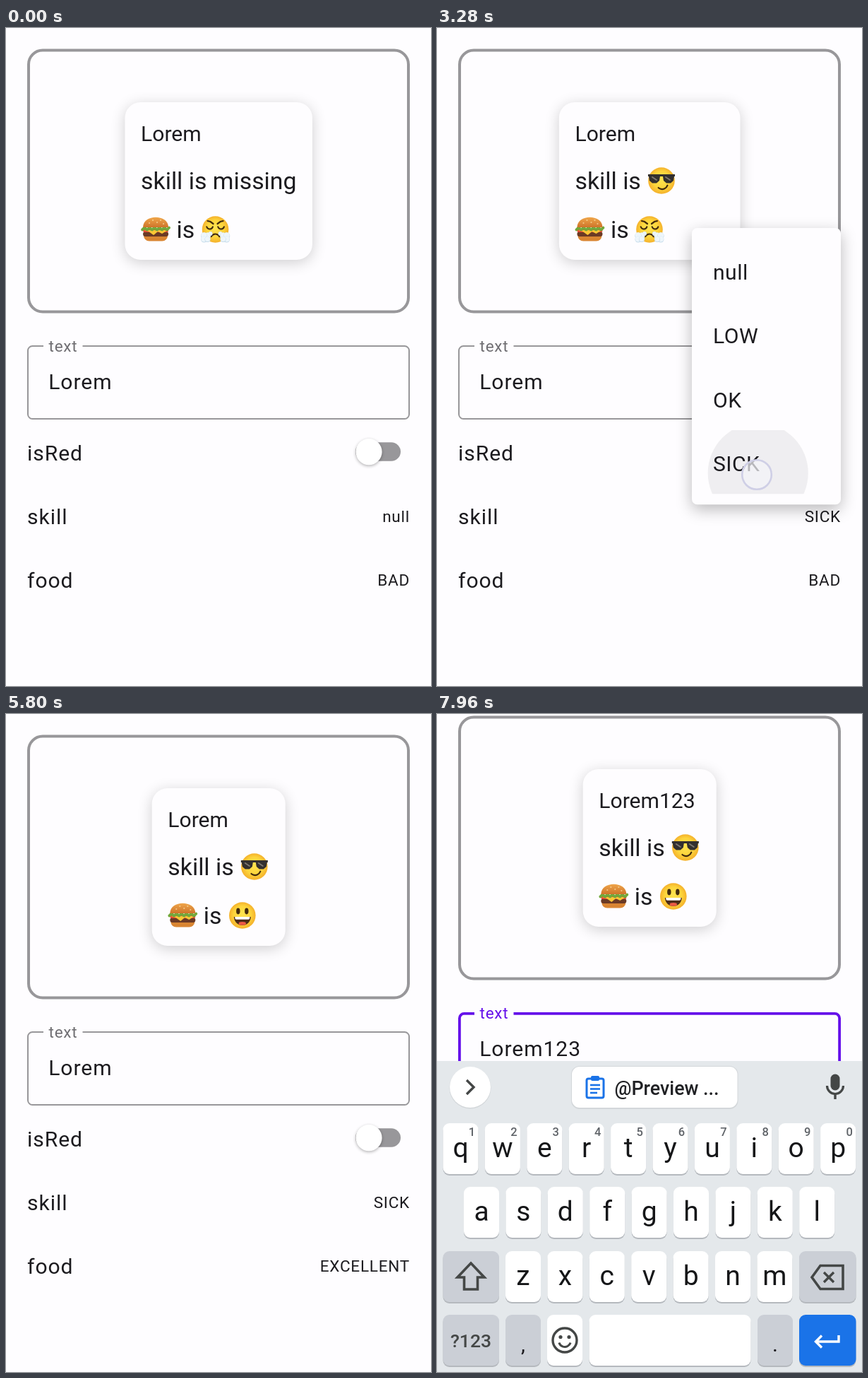
Recreate the animation shown at these times as an HTML page with a canvas. Size 602 by 931 pixels, loop 8000 ms.

```html
<!DOCTYPE html>
<html lang="en">
<head>
<meta charset="utf-8">
<title>Component preview</title>
<style>
html, body { margin: 0; width: 100%; height: 100%; overflow: hidden; background: #fefdff; }
canvas { display: block; }
</style>
</head>
<body>
<canvas id="stage" width="602" height="931"></canvas>
<script>
const ctx = document.getElementById('stage').getContext('2d');
const LOOP = 8000, BG = '#fefdff', INK = '#1c1b1f', PURPLE = '#6510ea', GREY = '#98979a';
const BODY = 30.08, TITLE = 33.84, SMALL = 22.56;

// Moments of the interaction, in ms
const RED_ON = 300, RED_OFF = 957, SKILL_TAP = 2335, SKILL_SET = 3237, FOOD_TAP = 4260,
  FOOD_SET = 5150, FOCUS = 6280, KEYS_UP = 6660, TYPED = [7100, 7240, 7380];

const taps = [
  { x: 195, y: 609, from: 140, to: RED_ON + 60 },
  { x: 195, y: 609, from: 790, to: RED_OFF + 60 },
  { x: 190, y: 698, from: 2170, to: SKILL_TAP + 60 },
  { x: 453, y: 632, from: 3010, to: SKILL_SET + 60 },
  { x: 190, y: 786, from: 4060, to: FOOD_TAP + 60 },
  { x: 455, y: 712, from: 4930, to: FOOD_SET + 60 },
  { x: 350, y: 505, from: 6040, to: FOCUS + 60 }
];

const menus = [
  { x: 361, y: 283, items: ['null', 'LOW', 'OK', 'SICK'], open: SKILL_TAP + 50, close: SKILL_SET + 50,
    pick: 3, tap: SKILL_SET, px: 453, py: 632 },
  { x: 346.5, y: 464, items: ['BAD', 'GOOD', 'EXCELLENT'], open: FOOD_TAP + 50, close: FOOD_SET + 50,
    pick: 2, tap: FOOD_SET, px: 455, py: 712 }
];

const clamp = v => Math.max(0, Math.min(1, v));
const mix = (a, b, k) => a + (b - a) * k;
const ramp = (t, start, length) => clamp((t - start) / length);

function bezier(x1, x2, y1, y2) {
  const at = (a, b, s) => 3 * a * s * (1 - s) ** 2 + 3 * b * s * s * (1 - s) + s ** 3;
  return x => {
    let lo = 0, hi = 1;
    for (let i = 0; i < 20; i++) {
      const mid = (lo + hi) / 2;
      if (at(x1, x2, mid) < x) lo = mid; else hi = mid;
    }
    return at(y1, y2, lo);
  };
}
const standard = bezier(0.4, 0.2, 0, 1);
const decelerate = bezier(0, 0.2, 0, 1);

function layer(draw, alpha = 1) {
  if (alpha <= 0) return;
  ctx.save();
  ctx.globalAlpha *= alpha;
  draw();
  ctx.restore();
}

function path(points, close) {
  ctx.beginPath();
  points.forEach(([x, y]) => ctx.lineTo(x, y));
  if (close) ctx.closePath();
}

function box(x, y, w, h, r, fill) {
  ctx.beginPath();
  ctx.roundRect(x, y, w, h, r);
  if (fill) { ctx.fillStyle = fill; ctx.fill(); }
}

function disc(x, y, rx, fill, ry = rx) {
  ctx.beginPath();
  ctx.ellipse(x, y, rx, ry, 0, 0, 7);
  ctx.fillStyle = fill;
  ctx.fill();
}

function stroke(color, width) {
  ctx.strokeStyle = color;
  ctx.lineWidth = width;
  ctx.stroke();
}

function arc(x, y, r, a, b, color, width) {
  ctx.beginPath();
  ctx.arc(x, y, r, a, b);
  stroke(color, width);
}

function label(s, x, y, size, { color = INK, gap = 0, align = 'left', weight = 400 } = {}) {
  ctx.font = `${weight} ${size}px Roboto, sans-serif`;
  ctx.letterSpacing = gap + 'px';
  ctx.fillStyle = color;
  ctx.textAlign = align;
  ctx.fillText(s, x, y);
  return ctx.measureText(s).width;
}

function raised(x, y, w, h, r, blur, drop, alpha) {
  layer(() => {
    ctx.shadowColor = `rgba(0,0,0,${alpha})`;
    ctx.shadowBlur = blur;
    ctx.shadowOffsetY = drop;
    box(x, y, w, h, r, BG);
  });
}

// Press ripple that drifts from the touch point to the middle of its box
function ripple(t, start, x, y, w, h, px, py) {
  const alpha = Math.min(ramp(t, start, 75), 1 - ramp(t, start + 225, 150));
  if (alpha <= 0) return;
  const k = standard(ramp(t, start, 225));
  layer(() => {
    box(x, y, w, h, 0);
    ctx.clip();
    const r = mix(0.3 * Math.max(w, h), Math.hypot(w, h) / 2 + 10, k);
    disc(mix(px, x + w / 2, k), mix(py, y + h / 2, k), r, 'rgba(10,10,16,.097)');
  }, alpha);
}

function face() {
  const g = ctx.createRadialGradient(0, -3, 2, 0, 0, 19);
  g.addColorStop(0, '#ffe24d');
  g.addColorStop(0.6, '#fdd43b');
  g.addColorStop(1, '#f4b02b');
  disc(0, 0, 18.8, g);
}

const emoji = {
  cool() {
    face();
    arc(1, 4, 8, 0.35, 2.3, '#422b0d', 2.2);
    ctx.fillStyle = '#33302f';
    ctx.fillRect(-19, -9, 38, 3);
    for (const s of [-1, 1]) {
      path([[s * 1.5, -9], [s * 18.5, -9], [s * 17, 0], [s * 13, 3.5], [s * 7, 3.5], [s * 3, 0]], true);
      ctx.fill();
    }
    for (const x of [-13, 6]) {
      path([[x, -5], [x + 6, -1]]);
      stroke('#7d7770', 2);
    }
  },
  huff() {
    face();
    for (const s of [-1, 1]) {
      path([[s * 3, -8], [s * 7, -11], [s * 11, -12]]);
      stroke('#422b0d', 2.2);
      arc(s * 8, -5, 4.5, 0.3, 2.85, '#422b0d', 2.2);
    }
    arc(0, 13, 6.5, 3.6, 5.83, '#422b0d', 2.2);
    for (const s of [-1, 1]) {
      for (const [x, y, r] of [[7, 6, 2.5], [11, 9, 4], [16, 9, 4.2], [16, 14, 4], [11, 14, 3.6]]) {
        disc(s * x, y, r + 0.5, '#c5dbea');
        disc(s * x, y - 0.5, r, '#eef6fb');
      }
    }
  },
  happy() {
    face();
    for (const s of [-1, 1]) disc(s * 6, -6, 2.7, '#422b0d', 4.4);
    path([[-12, 2], [12, 2]]);
    ctx.bezierCurveTo(11, 18, -11, 18, -12, 2);
    ctx.fillStyle = '#4c2b17';
    ctx.fill();
    box(-10.5, 2, 21, 3.8, [0, 0, 2, 2], '#fff');
    disc(0, 11.4, 5.2, '#ec5a45', 2.4);
  },
  burger() {
    box(-17, 7, 34, 9.5, [2, 2, 9, 9], '#d98532');
    box(-18, 3, 36, 7, 3.5, '#6b3a25');
    box(-18, 0, 36, 4, 2, '#e2482f');
    path([[-17, 1], [17, 1], [9, 6], [3, 3], [-3, 8], [-10, 3]], true);
    ctx.fillStyle = '#fcc735';
    ctx.fill();
    ctx.beginPath();
    for (let x = -19; x <= 19; x++) ctx.lineTo(x, -1 + 1.4 * Math.sin(x * 0.9));
    stroke('#72a83b', 3.8);
    path([[-18, -3]]);
    ctx.bezierCurveTo(-18, -22, 18, -22, 18, -3);
    const g = ctx.createLinearGradient(0, -17, 0, -2);
    g.addColorStop(0, '#efa54a');
    g.addColorStop(1, '#cc7128');
    ctx.fillStyle = g;
    ctx.fill();
    for (const [x, y] of [[-9, -9], [-4, -13], [2, -10], [7, -13], [11, -8]]) disc(x, y, 1.1, '#fbe0a4', 0.8);
  }
};

function glyph(name, x, y) {
  layer(() => {
    ctx.translate(x, y);
    ctx.lineCap = 'round';
    emoji[name]();
  });
}

function card(t, text) {
  box(32, 31.5, 538, 370, 20);
  stroke(GREY, 4);

  // Critically damped spring for the width
  const s = Math.max(0, t - SKILL_SET - 15) * 0.02;
  const w = mix(189, 265.5, (1 + s) * Math.exp(-s));
  const x = 301.2 - w / 2, left = x + 22.6;
  raised(x, 105, w, 223, 22, 20, 4, 0.19);
  label(text, left, 160, BODY, { color: t >= RED_ON && t < RED_OFF ? '#f00' : INK });
  if (t < SKILL_SET) {
    label('skill is missing', left, 228, TITLE);
  } else {
    label('skill is ', left, 228, TITLE);
    glyph('cool', left + 122.5, 216);
  }
  glyph('burger', left + 21, 285);
  label('is', left + 50.5, 296.5, TITLE);
  glyph(t < FOOD_SET ? 'huff' : 'happy', left + 105.5, 285);
}

function outline(color, w) {
  const l = 30 + w / 2, r = 572 - w / 2, top = 449 + w / 2, bottom = 554 - w / 2;
  ctx.beginPath();
  ctx.moveTo(108.5, top);
  ctx.arcTo(r, top, r, bottom, 6.5);
  ctx.arcTo(r, bottom, l, bottom, 6.5);
  ctx.arcTo(l, bottom, l, top, 6.5);
  ctx.arcTo(l, top, r, top, 6.5);
  ctx.lineTo(53, top);
  stroke(color, w);
  label('text', 60.5, 458, SMALL, { color: color === GREY ? '#6f6e72' : color, gap: 0.75 });
}

function field(t, text) {
  const focus = ramp(t, FOCUS, 150), width = mix(2, 3.8, focus);
  layer(() => outline(GREY, width), focus < 1 ? 1 : 0);
  layer(() => outline(PURPLE, width), focus);
  const w = label(text, 60.2, 511, BODY, { gap: 0.94 });
  if (t < FOCUS) return;

  if (t > KEYS_UP && t < TYPED[0]) {
    ctx.fillStyle = INK;
    ctx.fillRect(60.5, 513, w - 3, 2);
  }
  const lastInput = [FOCUS, ...TYPED].filter(v => v <= t).pop();
  const x = 59 + w;
  if ((t - lastInput) % 1000 < 500) {
    ctx.fillStyle = PURPLE;
    ctx.fillRect(x - 1.9, 479, 3.8, 40);
  }
}

function handle(t) {
  if (t < FOCUS || t >= TYPED[0]) return;
  const x = 149;
  disc(x, 555, 19.3, '#6200ee');
  path([[x, 527.5], [x + 13.8, 541.5], [x, 555], [x - 13.8, 541.5]], true);
  ctx.fill();
}

function toggle(t) {
  const on = t >= RED_ON && t < RED_OFF;
  const k = standard(ramp(t, RED_ON + 15, 100)) - standard(ramp(t, RED_OFF + 18, 100));
  box(495, 586.3, 64, 26.4, 13.2, on ? '#7cc1c0' : GREY);
  layer(() => {
    ctx.shadowColor = 'rgba(0,0,0,.3)';
    ctx.shadowBlur = 4;
    ctx.shadowOffsetY = 1.5;
    disc(mix(514, 540, k), 599.7, 18.6, on ? '#018786' : '#fff');
  });
}

function rows(t) {
  ripple(t, RED_ON, 0, 555, 602, 89.5, 195, 609);
  ripple(t, RED_OFF, 0, 555, 602, 89.5, 195, 609);
  ripple(t, SKILL_TAP, 0, 645, 602, 90, 190, 698);
  ripple(t, FOOD_TAP, 0, 735, 602, 90, 190, 786);
  ['isRed', 'skill', 'food'].forEach((s, i) => label(s, 30, 612 + 90 * i, BODY, { gap: 0.94 }));
  toggle(t);
  const value = { gap: 0.75, align: 'right' };
  label(t < SKILL_SET ? 'null' : 'SICK', 572, 699, SMALL, value);
  label(t < FOOD_SET ? 'BAD' : 'EXCELLENT', 572, 789, SMALL, value);
}

function menu(t, m) {
  if (t < m.open || t > m.close + 75) return;
  const w = 572 - m.x, h = m.items.length * 90.3 + 30;
  const scale = mix(0.8, 1, decelerate(ramp(t, m.open, 120)));
  layer(() => {
    ctx.translate(572, m.y + h);
    ctx.scale(scale, scale);
    ctx.translate(-572, -m.y - h);
    raised(m.x, m.y, w, h, 7.5, 22, 7, 0.27);
    m.items.forEach((s, i) => label(s, m.x + 30, m.y + 73 + 90.3 * i, BODY, { gap: 0.5 }));
    ripple(t, m.tap, m.x, m.y + 15 + 90.3 * m.pick, w, 90.3, m.px, m.py);
  }, Math.min(ramp(t, m.open, 30), 1 - ramp(t, m.close, 75)));
}

function touch(t, { x, y, from, to }) {
  layer(() => {
    disc(x, y, 21, 'rgba(244,244,248,.72)');
    arc(x, y, 20.8, 0, 7, '#cfcfe6', 2.6);
  }, Math.min(ramp(t, from, 100), 1 - ramp(t, to, 120)));
}

function key(x, y, w, fill = '#fff') {
  box(x, y + 2, w, 72, 9, '#b5b9be');
  box(x, y, w, 72, 9, fill);
}

function keyRow(letters, x, y, hints) {
  [...letters].forEach((c, i) => {
    const left = x + 59.4 * i;
    key(left, y, 50);
    label(c, left + 25, y + 48, 39, { color: '#151618', align: 'center' });
    if (hints) label((i + 1) % 10, left + 41, y + 18, 16.5, { color: '#5f6368', align: 'center', weight: 500 });
  });
}

function suggestion(t) {
  const wide = t < TYPED[0];
  const x = wide ? 102 : 191, w = wide ? 416 : 234.5;
  const cx = wide ? 134 : 224;
  box(x - 1, 498, w + 2, 61, 12, '#d3d7da');
  box(x, 499, w, 58, wide ? [11, 0, 0, 11] : 11, '#fff');
  box(cx - 12, 516, 24, 27, 2.5);
  stroke('#1a73e8', 3);
  box(cx - 6, 512, 12, 7, 2, '#1a73e8');
  [[525, 7], [530.5, 7], [536, 3]].forEach(([y, end]) => {
    path([[cx - 7, y], [cx + end, y]]);
    stroke('#1a73e8', 2.6);
  });
  label(wide ? '@Preview @Composable fun' : '@Preview ...', cx + 27.5, 539, 26.8, { color: '#202124', weight: 500 });
}

function toolbar(t) {
  disc(47, 529, 29.5, '#d3d7da');
  disc(47, 528, 29, '#fff');
  path([[42, 518], [52, 528], [42, 538]]);
  stroke('#444746', 3.4);
  suggestion(t);
  box(557.5, 509.5, 13, 23, 6.5, '#444746');
  arc(564, 526, 11.5, 0, Math.PI, '#444746', 3.2);
  path([[564, 537], [564, 545]]);
  stroke('#444746', 3.4);
}

function specialKeys() {
  const dark = '#cbcfd6', ink = '#444746';
  key(8.5, 760, 79.5, dark);
  key(513, 760, 80.5, dark);
  key(8.5, 850, 79.5, dark);
  key(97, 850, 50, dark);
  key(156, 850, 50);
  key(215.5, 850, 229);
  key(454, 850, 50, dark);
  key(513, 850, 80.5, '#1a73e8');

  path([[48, 777], [67, 797], [57.5, 797], [57.5, 814], [38.5, 814], [38.5, 797], [29, 797]], true);
  stroke(ink, 3.6);
  path([[543, 780.5], [575, 780.5], [575, 813.5], [543, 813.5], [531, 797]], true);
  stroke(ink, 3.6);
  for (const s of [-1, 1]) {
    path([[548, 797 - 7 * s], [562, 797 + 7 * s]]);
    stroke(ink, 3.4);
  }
  label('?123', 48, 896, 26.5, { color: ink, align: 'center', weight: 500 });
  label(',', 122, 902, 30, { align: 'center' });
  label('.', 479, 902, 30, { align: 'center' });
  arc(181, 886, 17, 0, 7, ink, 3.4);
  disc(175, 881.5, 2.6, ink);
  disc(187, 881.5, 2.6, ink);
  arc(181, 887, 8.5, 0.3, 2.84, ink, 3);
  path([[569, 879], [569, 888], [537, 888]]);
  stroke('#fff', 3.4);
  path([[545, 879.5], [536.5, 888], [545, 896.5]]);
  stroke('#fff', 3.4);
}

function keyboard(t, k) {
  if (k <= 0) return;
  layer(() => {
    ctx.translate(0, 439 * (1 - k));
    ctx.fillStyle = '#e4e8eb';
    ctx.fillRect(0, 491, 602, 440);
    toolbar(t);
    keyRow('qwertyuiop', 8.5, 579, true);
    keyRow('asdfghjkl', 38, 669);
    keyRow('zxcvbnm', 97, 760);
    specialKeys();
  }, 1);
  // Veil stands in for the keyboard's own fade, keeping its parts flat
  layer(() => {
    ctx.fillStyle = BG;
    ctx.fillRect(0, 491 + 439 * (1 - k), 602, 440);
  }, 0.55 * (1 - ramp(k, 0.32, 0.5)));
  layer(() => {
    ctx.fillStyle = '#333';
    ctx.fillRect(0, 922, 602, 9);
  }, 1 - ramp(k, 0.45, 0.25));
}

function draw(t) {
  const text = 'Lorem' + '123'.slice(0, TYPED.filter(v => v <= t).length);
  const rise = standard(ramp(t, KEYS_UP, 300));
  ctx.fillStyle = BG;
  ctx.fillRect(0, 0, 602, 931);
  layer(() => {
    ctx.translate(0, -27 * rise ** 0.79);
    card(t, text);
    field(t, text);
    rows(t);
    handle(t);
  });
  menus.forEach(m => menu(t, m));
  keyboard(t, rise);
  taps.forEach(p => touch(t, p));
}

const start = performance.now();
function tick() {
  draw((performance.now() - start) % LOOP);
  requestAnimationFrame(tick);
}
tick();
</script>
</body>
</html>
```
